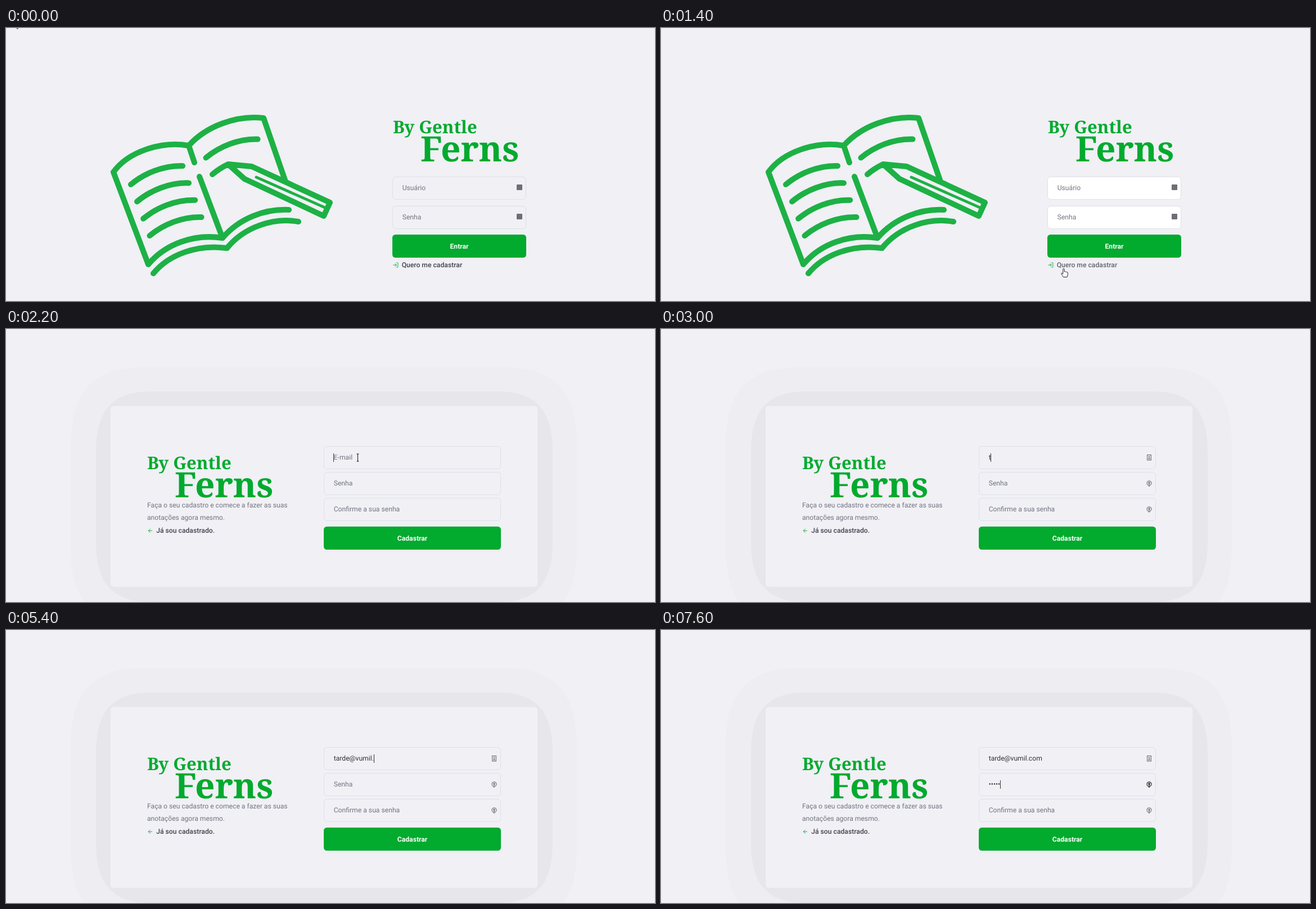
An HTML page for the animation above (8000 ms loop, 1154 by 485 pixels).

```html
<!DOCTYPE html>
<html lang="pt-BR">
<head>
<meta charset="utf-8">
<title>Cadastro</title>
<style>
html, body { margin: 0; width: 100%; height: 100%; overflow: hidden; background: #f0f0f5; }
svg { display: block; font: 12.16px Roboto, sans-serif; text-rendering: geometricPrecision; }
.box { fill: #f0f0f5; stroke: #dfdfe8; }
.white .box { fill: #fff; }
.hint { fill: #737380; }
.typed { fill: #333; }
.link { fill: #41414d; font-weight: 500; }
.white .link { opacity: .8; }
.btn { fill: #02aa2e; }
.label { fill: #fff; font-weight: 700; text-anchor: middle; }
.brand { fill: #02aa2e; font-family: "Noto Serif", serif; font-weight: 700; }
.book, .icon { fill: none; stroke-linecap: round; stroke-linejoin: round; }
.book { stroke: #1db145; stroke-width: 10; }
.icon { stroke: #02aa2e; stroke-width: 2; }
.help { fill: none; stroke: #77777f; stroke-width: 1.2; }
.help .dot { fill: #77777f; stroke: none; }
.on .help { stroke: #222; }
.on .help .dot { fill: #222; }
.pointer { fill: #fff; stroke: #111; stroke-width: .9; stroke-linejoin: round; }
</style>
</head>
<body>
<svg width="1154" height="485" viewBox="0 0 1154 485">
  <defs>
    <g id="brand" class="brand">
      <text x="0" y="21" font-size="31">By Gentle</text>
      <text x="49" y="71" font-size="62">Ferns</text>
    </g>
    <path id="row" d="M222 278C246 258 280 244 314 245"/>
  </defs>

  <g id="login">
    <g class="book">
      <path d="M325 209C276 200 217 220 191 256L253 420C283 384 334 365 385 373C415 338 460 321 503 323"/>
      <path d="M335 239L325 209C355 175 410 154 458 160L496 270M344 264L385 373"/>
      <path d="M262 436C290 402 340 384 393 391C423 354 475 336 520 344"/>
      <use href="#row"/><use href="#row" x="11" y="30.4"/>
      <use href="#row" x="22.2" y="60.7"/><use href="#row" x="33.5" y="91"/>
      <use href="#row" x="133.5" y="-47.5"/>
      <path d="M367 260Q380 249 395 242M395 242L437 246L576 310L565 334L424 268Z"/>
      <path d="M445 265L567 319" stroke-width="5"/>
    </g>
    <use href="#brand" x="688" y="166"/>
    <g id="loginForm"></g>
  </g>

  <g id="signup">
    <g id="shadow"></g>
    <rect x="186" y="137" width="759" height="321" rx="5" fill="#f0f0f5"/>
    <use href="#brand" x="251" y="228"/>
    <text class="hint" x="251" y="317">Faça o seu cadastro e comece a fazer as suas</text>
    <text class="hint" x="251" y="339">anotações agora mesmo.</text>
    <g id="signupForm"></g>
    <g id="helpers">
      <g class="help"><path d="M864.6 223.6h6.8v9.2h-6.8zM866.5 230.7h3"/><circle class="dot" cx="868" cy="226.6" r="1.2"/><path d="M866.3 229h3.4"/></g>
      <g id="keys"></g>
    </g>
    <text id="mail" class="typed" x="582.7" y="232.4"></text>
    <text id="pass" class="typed" x="582.7" y="278.4"></text>
    <rect id="caret" width="1" height="15" fill="#333"/>
  </g>

  <path id="arrow" class="pointer" d="M0 0v12l2.8-2.6 2 4.2 1.7-.8-2-4.1h3.8z"/>
  <path id="hand" class="pointer" d="M-1.2 1.2Q0-.8 1.2 1.2V6Q2.4 5 3.4 6.4Q4.8 5.4 5.6 6.9Q7.4 6.2 7.4 8.4V11L6 15.5H-.5L-4 10Q-4.4 8 -2.8 8.6L-1.2 10Z"/>
  <path id="beam" fill="none" stroke="#111" d="M-2 -6.5h4M0 -6.5V6.5M-2 6.5h4"/>
</svg>
<script>
const $ = id => document.getElementById(id);
const show = (id, on) => $(id).style.display = on ? '' : 'none';

const field = (x, y, w, hint, id = '') =>
  `<rect class="box" x="${x}" y="${y}" width="${w}" height="40" rx="5.4"/>
   <text class="hint" id="${id}" x="${x + 17.2}" y="${y + 23.9}">${hint}</text>`;
const button = (x, y, w, label) =>
  `<rect class="btn" x="${x}" y="${y}" width="${w}" height="41" rx="5.4"/>
   <text class="label" x="${x + w / 2}" y="${y + 24.7}">${label}</text>`;
const link = (x, y, icon, label) =>
  `<path class="icon" transform="translate(${x} ${y - 9.4}) scale(.45)" d="${icon}"/>
   <text class="link" x="${x + 16.2}" y="${y}">${label}</text>`;
const square = y => `<rect x="908" y="${y}" width="10" height="10" rx="1" fill="#6e6e76"/>`;
const key = (y, id) =>
  `<g id="${id}" transform="translate(0 ${y})"><g class="help">
   <path d="M866.4 277.6A4 4 0 1 1 869.6 277.6L868 279.4Z"/>
   <path class="dot" d="M868 271.6a1.7 1.7 0 0 1 .8 3.2v2.4h-1.6v-2.4a1.7 1.7 0 0 1 .8-3.2"/></g></g>`;

// Rectangle with squarish, superellipse-like corners
function blob(x, y, w, h, rx, ry, fill) {
  const a = rx * .3, b = ry * .3;
  return `<path fill="${fill}" d="M${x + rx} ${y}h${w - 2 * rx}c${rx - a} 0 ${rx} ${b} ${rx} ${ry}
    v${h - 2 * ry}c0 ${ry - b} ${-a} ${ry} ${-rx} ${ry}h${2 * rx - w}c${a - rx} 0 ${-rx} ${-b} ${-rx} ${-ry}
    v${2 * ry - h}c0 ${b - ry} ${a} ${-ry} ${rx} ${-ry}"/>`;
}

$('shadow').innerHTML =
  blob(115, 68, 900, 459, 130, 140, '#eeeef2') + blob(160, 111, 812, 374, 98, 108, '#e7e7eb');
$('loginForm').innerHTML =
  field(687.5, 264.5, 237, 'Usuário') + square(278) +
  field(687.5, 316.5, 237, 'Senha') + square(330) +
  button(687, 367, 238, 'Entrar') +
  link(687.5, 425, 'M15 3h4a2 2 0 0 1 2 2v14a2 2 0 0 1-2 2h-4M10 17l5-5-5-5M15 12H3', 'Quero me cadastrar');
$('signupForm').innerHTML =
  field(565.5, 208.5, 314, 'E-mail', 'mailHint') +
  field(565.5, 254.5, 314, 'Senha', 'passHint') +
  field(565.5, 300.5, 314, 'Confirme a sua senha') +
  button(565, 351, 315, 'Cadastrar') +
  link(251, 362.3, 'M19 12H5M12 19l-7-7 7-7', 'Já sou cadastrado.');
$('keys').innerHTML = key(0, 'passKey') + key(46, 'confirmKey');

const address = 'tarde@vumil.com';
// [time, characters typed]
const typing = [[3000, 1], [3200, 2], [3400, 4], [3800, 5], [4200, 6], [4800, 7],
  [5000, 8], [5200, 10], [5400, 12], [5600, 15]];
const typedAt = t => typing.reduce((n, [at, count]) => t >= at ? count : n, 0);
const mix = (a, b, k) => a + (b - a) * k;

function pointer(t) {
  if (t < 600) return ['arrow', 15, -12];
  if (t < 1600) {
    const k = Math.min(1, (t - 400) / 1000), e = k * k * (3 - 2 * k);
    return [t < 1400 ? 'arrow' : 'hand', mix(15, 716, e), mix(-12, 427, e)];
  }
  if (t < 1800) return ['arrow', 716.5, 426.5];
  if (t < 2000) return ['arrow', 724, 385];
  if (t < 2200) return ['arrow', 690, 305];
  if (t < 3000) return ['beam', 625.5, 228.5];
  return ['', 0, 0];
}

function draw(now) {
  const t = Math.floor(now % 8000 / 200) * 200; // the screen refreshes five times a second
  const inPass = t >= 6000;
  show('login', t < 1600);
  show('signup', t >= 1600);
  $('login').setAttribute('class', t >= 1000 ? 'white' : '');

  const count = typedAt(t), dots = Math.min(5, Math.max(0, (t - 6600) / 200));
  $('mail').textContent = address.slice(0, count);
  $('pass').textContent = '•'.repeat(dots);
  show('mailHint', !count);
  show('passHint', !dots);
  show('helpers', t >= 2600);
  $('passKey').setAttribute('class', inPass ? 'on' : '');

  const active = $(inPass ? 'pass' : 'mail');
  show('caret', t >= 2200 && t !== 2600 && t !== 6600);
  if (t >= 2200) {
    const width = active.textContent ? active.getComputedTextLength() : 0;
    $('caret').setAttribute('x', Math.round(582.4 + width));
    $('caret').setAttribute('y', inPass ? 267 : 221);
  }

  const [shape, x, y] = pointer(t);
  for (const id of ['arrow', 'hand', 'beam']) show(id, id === shape);
  if (shape) $(shape).setAttribute('transform', `translate(${x} ${y})`);
}

const start = performance.now();
function loop() {
  draw(performance.now() - start);
  requestAnimationFrame(loop);
}
loop();
</script>
</body>
</html>
```
